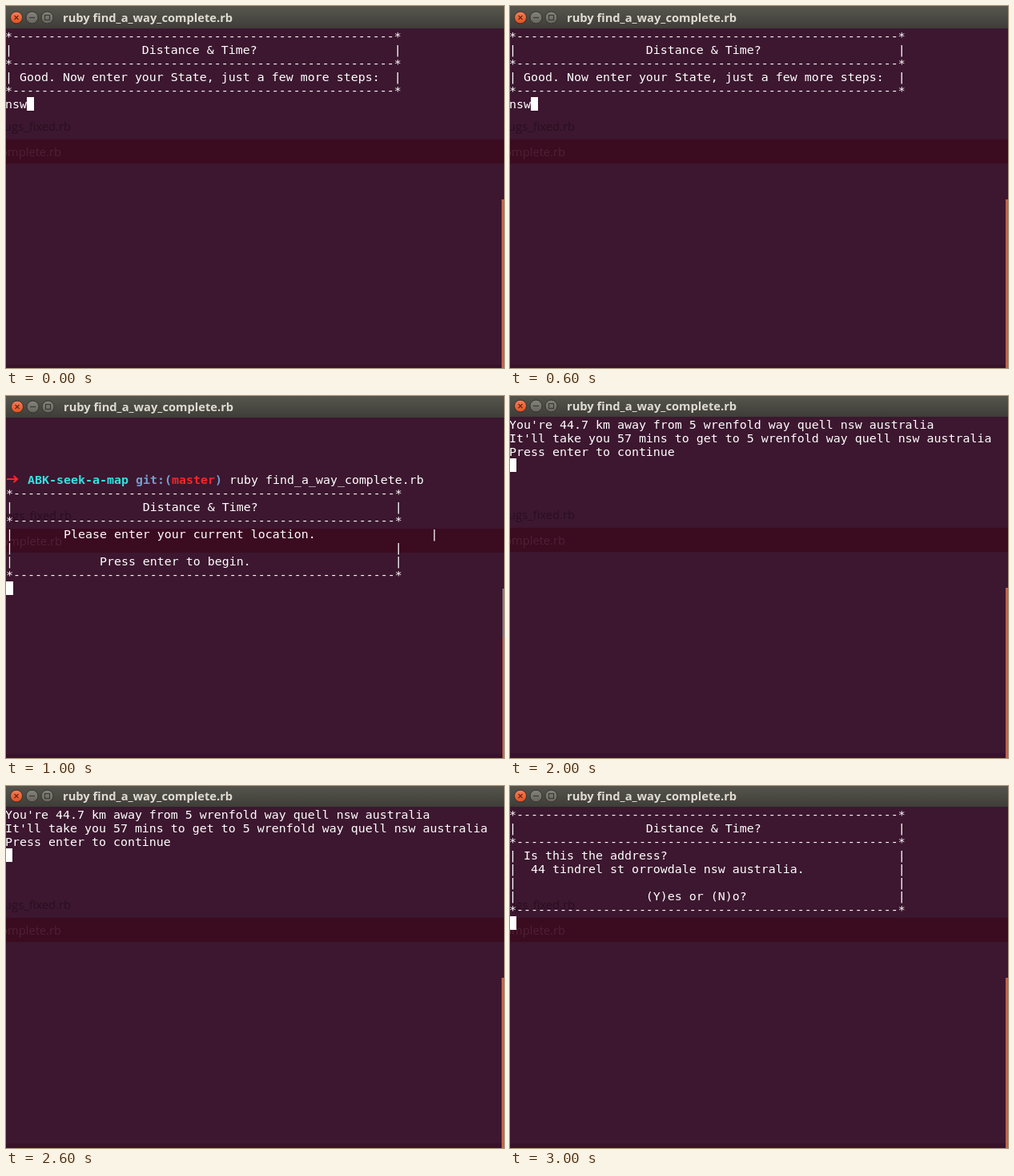
Recreate the animation shown at these times as an HTML page. Size 622x453 px, loop 4000 ms.

```html
<!DOCTYPE html>
<html lang="en">
<head>
<meta charset="utf-8">
<title>Terminal session</title>
<style>
  html, body { margin: 0; width: 100%; height: 100%; overflow: hidden; background: #3c172f; }
  svg { display: block; width: 622px; height: 453px; }
  .term text { font: 14.95px "DejaVu Sans Mono", monospace; fill: #fff; white-space: pre; }
  .term .bold { font-weight: 700; }
  .label { font: 700 14.7px "Open Sans", sans-serif; fill: #dfdbd2; }
  .ghost { font: 14.7px "Open Sans", sans-serif; text-anchor: end; }
</style>
</head>
<body>
<svg viewBox="0 0 622 453">
  <defs>
    <linearGradient id="bar" x1="0" y1="0" x2="0" y2="1">
      <stop offset="0" stop-color="#57564e"/>
      <stop offset="1" stop-color="#3e3d38"/>
    </linearGradient>
    <linearGradient id="close" x1="0" y1="0" x2="0" y2="1">
      <stop offset="0" stop-color="#f57f5b"/>
      <stop offset="1" stop-color="#e2501f"/>
    </linearGradient>
    <linearGradient id="grey" x1="0" y1="0" x2="0" y2="1">
      <stop offset="0" stop-color="#85837a"/>
      <stop offset="1" stop-color="#66645c"/>
    </linearGradient>
  </defs>
  <rect width="622" height="453" fill="#3c172f"/>
  <g id="window">
    <rect x="-2" y="167" width="626" height="30" fill="#3b0b20"/>
    <rect x="-2" y="449" width="626" height="8" fill="#371229"/>
    <text class="ghost" x="81" y="156" fill="#2a0e20">bugs_fixed.rb</text>
    <text class="ghost" x="69" y="188" fill="#502136">complete.rb</text>

    <rect x="619" y="242" width="4" height="215" fill="#bf644a"/>
    <rect id="track" x="619" y="242" width="4" height="61" fill="#85747d"/>

    <rect x="-2" y="0" width="626" height="28" fill="url(#bar)"/>
    <g stroke="#33322d" fill="url(#grey)">
      <circle cx="13" cy="14.5" r="7.5" fill="url(#close)"/>
      <circle cx="32.5" cy="14.5" r="7.5"/>
      <circle cx="51.5" cy="14.5" r="7.5"/>
    </g>
    <g stroke="#3a3933" stroke-width="1.2" fill="none">
      <path d="M10.5 12l5 5m0-5l-5 5" stroke="#6b2512"/>
      <path d="M29 14.5h7"/>
      <rect x="48.5" y="11.5" width="6" height="6"/>
    </g>
    <text class="label" x="71" y="20">ruby find_a_way_complete.rb</text>
    <g class="term" id="term"></g>
  </g>
</svg>
<script>
const CELL = 9, LINE = 17, LEFT = -1, TOP = 29, ASCENT = 14;
const STEP = 1000;
const $ = id => document.getElementById(id);

const rule = "*" + "-".repeat(53) + "*";
const boxed = (text = "", col = 2, end = 54) =>
  ("|".padEnd(col) + text).padEnd(end) + "|";
const heading = [rule, boxed("Distance & Time?", 19), rule];
const place = "5 wrenfold way quell nsw australia";

// Coloured runs: [column, text, colour, bold]
const prompt = [
  [3, "ABK-seek-a-map", "#34e2e2", true],
  [18, "git:(", "#729fcf", true],
  [23, "master", "#ef2929", true],
  [29, ")", "#729fcf", true],
  [31, "ruby find_a_way_complete.rb", "#fff", false]
];

const screens = [
  {
    dx: 0, dy: 0, cursor: [3, 5],
    lines: [...heading, boxed("Good. Now enter your State, just a few more steps:"), rule, "nsw"]
  },
  {
    dx: 1, dy: -1, cursor: [0, 12], scrolled: true,
    lines: ["", "", "", "", prompt, ...heading,
      boxed("Please enter your current location.", 8, 59), boxed(),
      boxed("Press enter to begin.", 13), rule]
  },
  {
    dx: 0, dy: -2, cursor: [0, 3],
    lines: [`You're 44.7 km away from ${place}`,
      `It'll take you 57 mins to get to ${place}`,
      "Press enter to continue"]
  },
  {
    dx: 0, dy: -2, cursor: [0, 8],
    lines: [...heading, boxed("Is this the address?"),
      boxed("44 tindrel st orrowdale nsw australia.", 3), boxed(),
      boxed("(Y)es or (N)o?", 19), rule]
  }
];

function add(tag, attrs, text = "") {
  const el = document.createElementNS("http://www.w3.org/2000/svg", tag);
  for (const key in attrs) el.setAttribute(key, attrs[key]);
  el.textContent = text;
  $("term").append(el);
  return el;
}

function addRun(row, col, text, color = "#fff", bold = false) {
  const el = add("text", {
    x: LEFT + col * CELL, y: TOP + row * LINE + ASCENT, class: bold ? "bold" : ""
  }, text);
  el.style.fill = color;
}

function addArrow(row) {
  const y = TOP + row * LINE + 8;
  add("path", {
    d: `M0 ${y}H12M8.5 ${y - 4}L13 ${y}L8.5 ${y + 4}`,
    fill: "none", stroke: "#ef2929", "stroke-width": 2.2
  });
}

function show({ dx, dy, cursor: [col, row], scrolled, lines }) {
  $("window").setAttribute("transform", `translate(${dx} ${dy})`);
  $("track").setAttribute("visibility", scrolled ? "visible" : "hidden");
  $("term").replaceChildren();
  lines.forEach((line, i) => {
    if (Array.isArray(line)) {
      addArrow(i);
      line.forEach(run => addRun(i, ...run));
    } else if (line) {
      addRun(i, 0, line);
    }
  });
  add("rect", {
    x: LEFT + col * CELL, y: TOP + row * LINE, width: CELL, height: LINE, fill: "#fff"
  });
}

const start = performance.now();
let current = -1;

function tick() {
  const index = Math.floor((performance.now() - start) / STEP) % screens.length;
  if (index !== current) show(screens[current = index]);
  requestAnimationFrame(tick);
}
tick();
</script>
</body>
</html>
```
